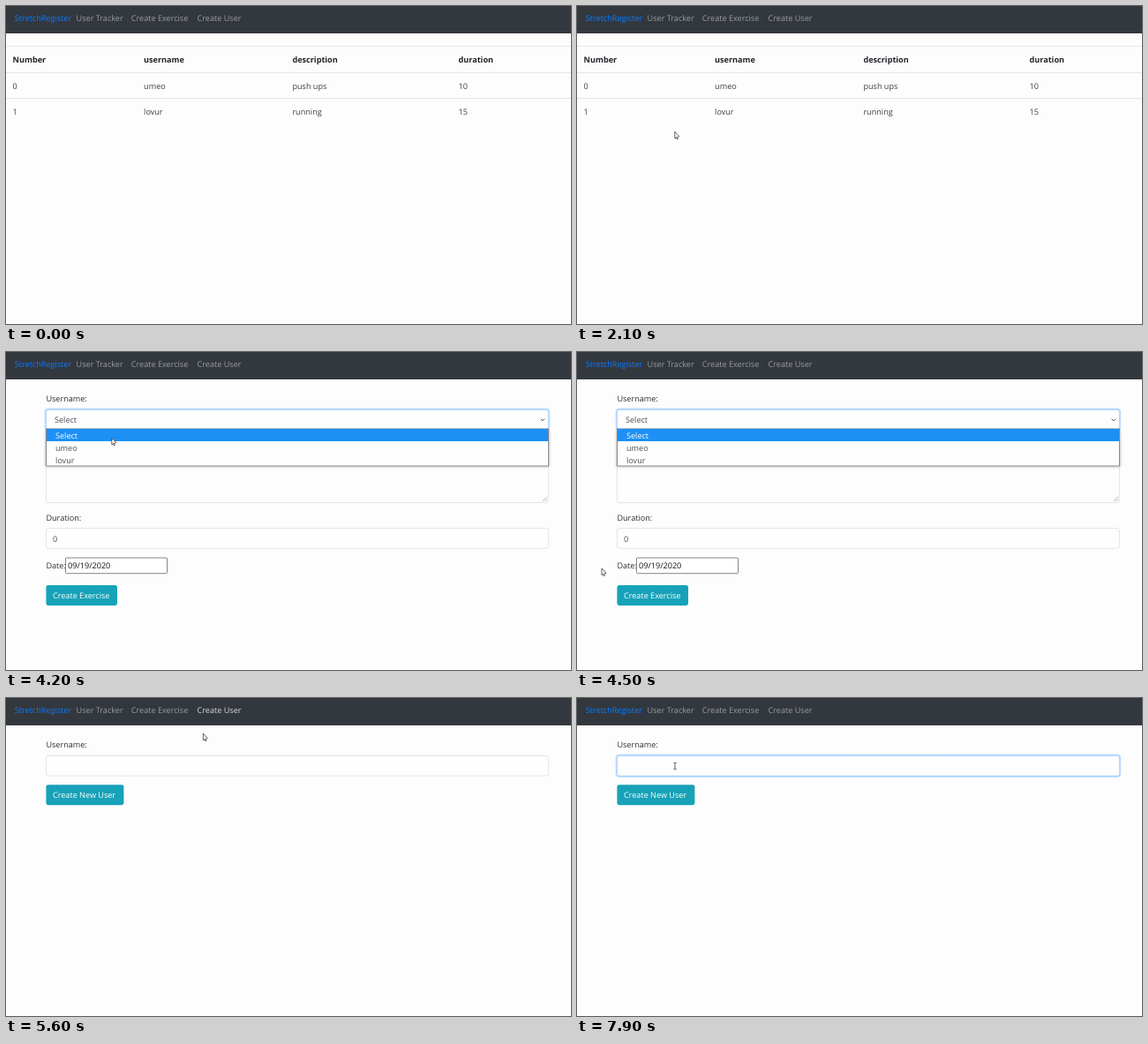
An HTML page with a canvas for the animation above (8000 ms loop, 640x360 px).

```html
<!DOCTYPE html>
<html lang="en">
<head>
<meta charset="utf-8">
<title>Exercise log</title>
<style>
  html, body { margin: 0; width: 100%; height: 100%; overflow: hidden; background: #fdfdfd; }
  canvas { display: block; width: 640px; height: 360px; }
</style>
</head>
<body>
<canvas id="stage"></canvas>
<script>
const LOOP = 8000, STEP = 100, BLINK = 530;
const FONT = '9.1px "Open Sans", "Noto Sans", sans-serif';
const INK = '#2b2f33', FIELD_INK = '#495057', LINE = '#ced4da';
const LEFT = 45.4, ROW = 29.4;
const USERS = ['umeo', 'lovur'];
const LINKS = [
  { label: 'User Tracker', x: 79.6 },
  { label: 'Create Exercise', x: 141.8 },
  { label: 'Create User', x: 216.6 }
];

const canvas = document.getElementById('stage');
const dpr = window.devicePixelRatio || 1;
canvas.width = 640 * dpr;
canvas.height = 360 * dpr;
const c = canvas.getContext('2d');

// Moments of the story, in ms
const T = {
  pointer: 1200, hoverExercise: 2700, exercisePage: 3000, open: 4000,
  hoverUser: 5200, userPage: 5400, focus: 6200
};

// The pointer eases from stop to stop
const STOPS = [
  { at: T.pointer, x: 72, y: 262 },
  { at: 1700, x: 76, y: 41 },
  { at: 2100, x: 110.5, y: 142 },
  { at: 2900, x: 175, y: 19.8 },
  { at: 3200, x: 175, y: 19.8 },
  { at: 4200, x: 119.5, y: 97 },
  { at: 4600, x: 12, y: 270 },
  { at: 5300, x: 227, y: 16.5 },
  { at: 5600, x: 223, y: 40 },
  { at: T.focus, x: 69, y: 78 },
  { at: 6400, x: 117, y: 79 },
  { at: 6900, x: 111, y: 77 }
];

const mix = (a, b, u) => a + (b - a) * u;
const between = (v, a, b) => v >= a && v < b;

function pointerAt(t) {
  const next = STOPS.findIndex(s => s.at > t);
  if (next < 1) return STOPS[next ? STOPS.length - 1 : 0];
  const a = STOPS[next - 1], b = STOPS[next];
  const u = (1 - Math.cos(Math.PI * (t - a.at) / (b.at - a.at))) / 2;
  return { x: mix(a.x, b.x, u), y: mix(a.y, b.y, u) };
}

function text(s, x, y, color = INK, bold = false) {
  c.font = (bold ? 'bold ' : '') + FONT;
  c.fillStyle = color;
  c.fillText(s, x, y);
}

function rect(x, y, w, h, color) {
  c.fillStyle = color;
  c.fillRect(x, y, w, h);
}

function box(x, y, w, h, r, fill, line, width) {
  c.beginPath();
  c.roundRect(x, y, w, h, r);
  c.fillStyle = fill;
  c.fill();
  if (!line) return;
  c.strokeStyle = line;
  c.lineWidth = width;
  c.stroke();
}

function field(y, h, focused) {
  if (focused) box(LEFT - .6, y - .6, 570.2, h + 1.2, 3, '#fff', '#bfdeff', 2.4);
  box(LEFT, y, 569, h, 2.4, '#fefefe', focused ? '#8fc3fc' : LINE, .6);
}

function button(label, y, w, hover = false) {
  box(LEFT, y, w, 23, 2.4, hover ? '#138496' : '#17a2b8');
  text(label, 53, y + 15, '#fff');
}

function line(color, width, ...points) {
  c.beginPath();
  points.forEach(([x, y]) => c.lineTo(x, y));
  c.strokeStyle = color;
  c.lineWidth = width;
  c.stroke();
}

function navbar(t) {
  rect(0, 0, 640, 31, '#33383f');
  text('StretchRegister', 9.8, 17.3, '#0a7bff');
  const lit = between(t, T.hoverExercise, T.open) ? LINKS[1]
    : between(t, T.hoverUser, T.focus) ? LINKS[2] : null;
  for (const link of LINKS)
    text(link.label, link.x, 17.3, link === lit ? '#d6d8da' : '#999c9f');
}

function tablePage() {
  const rows = [
    ['Number', 'username', 'description', 'duration'],
    ['0', USERS[0], 'push ups', '10'],
    ['1', USERS[1], 'running', '15']
  ];
  rows.forEach((row, r) => {
    rect(0, Math.round(45.4 + ROW * r), 640, 1, '#e2e5e8');
    row.forEach((s, i) =>
      text(s, 7.6 + 138.6 * i + 9.9 * i * i, 64.2 + ROW * r, r ? '#3b3f43' : '#212529', !r));
  });
}

function popup() {
  c.save();
  c.shadowColor = 'rgba(0,0,0,.4)';
  c.shadowBlur = 3 * dpr;
  c.shadowOffsetY = dpr;
  rect(45, 86.5, 570, 42.8, '#85898d');
  c.restore();
  rect(46, 87, 568, 41.5, '#fefefe');
  rect(46, 87, 568, 14, '#1e90f5');
  ['Select', ...USERS].forEach((s, i) =>
    text(s, 56, 98.2 + i * 14, i ? FIELD_INK : '#fff'));
}

function exercisePage(t) {
  const open = t >= T.open;
  text('Username:', LEFT, 56.3);
  field(65.4, 22.7, open);
  text('Select', 55, 80.3, FIELD_INK);
  line('#343a40', .9, [605.6, 75.7], [607.8, 77.9], [610, 75.7]);

  text('description:', LEFT, 108.8);
  field(117.5, 53, false);
  for (const d of [2.4, 5]) line('#8b8e91', .6, [613 - d, 169], [613, 169 - d]);

  text('Duration:', LEFT, 191.2);
  field(199.6, 22.7, false);
  text('0', 53, 215.1, FIELD_INK);

  text('Date:', LEFT, 245.2);
  box(67.5, 233, 115, 17.7, 1, '#fff', '#777', .9);
  text('09/19/2020', 70, 245.2, '#111');
  button('Create Exercise', 264, 80.6);
  if (open) popup();
}

function userPage(t, { x, y }) {
  const focused = t >= T.focus;
  const caretOn = Math.floor((t - T.focus) / BLINK) % 2 === 0;
  text('Username:', LEFT, 56.3);
  field(65.4, 22.7, focused);
  if (focused && caretOn) rect(53, 69.5, 1, 13.5, '#7c8186');
  button('Create New User', 98.2, 88, between(x, 45, 133) && between(y, 98, 121));
}

function arrow() {
  c.beginPath();
  c.moveTo(.3, .3);
  c.lineTo(.3, 7.8);
  c.lineTo(5.3, 5.6);
  c.closePath();
  c.fillStyle = '#fff';
  c.fill();
  c.strokeStyle = '#222';
  c.lineWidth = .7;
  c.stroke();
  line('#222', 1.6, [2.3, 6.2], [3.5, 8.8]);
  line('#fff', .7, [2.1, 5.8], [3.3, 8.3]);
}

function hand() {
  box(-2.7, 4, 7, 5.8, 2, '#fff', '#222', .6);
  box(-.8, .2, 1.7, 6, .8, '#fff', '#222', .6);
  rect(-.6, 4.2, 1.4, 3, '#fff');
}

function beam() {
  rect(-.4, -3.8, .8, 7.6, '#333');
  for (const y of [-4, 3.3]) rect(-1.8, y, 3.6, .7, '#555');
}

function pointer(t, { x, y }) {
  const onLink = y < 26 && between(x, 141, 268);
  const onUserPage = t >= T.userPage;
  const onButton = onUserPage && between(y, 98, 122);
  const onField = onUserPage && between(y, 64, 90);
  c.save();
  c.translate(x, y);
  (onLink || onButton ? hand : onField ? beam : arrow)();
  c.restore();
}

function draw(t) {
  const spot = pointerAt(t);
  c.setTransform(dpr, 0, 0, dpr, 0, 0);
  c.textRendering = 'geometricPrecision';
  rect(0, 0, 640, 360, '#fdfdfd');
  navbar(t);
  if (t < T.exercisePage) tablePage();
  else if (t < T.userPage) exercisePage(t);
  else userPage(t, spot);
  if (t >= T.pointer) pointer(t, spot);
}

const start = performance.now();
function tick(now) {
  const t = Math.max(0, now - start) % LOOP;
  draw(Math.floor(t / STEP) * STEP);
  requestAnimationFrame(tick);
}
draw(0);
requestAnimationFrame(tick);
</script>
</body>
</html>
```
